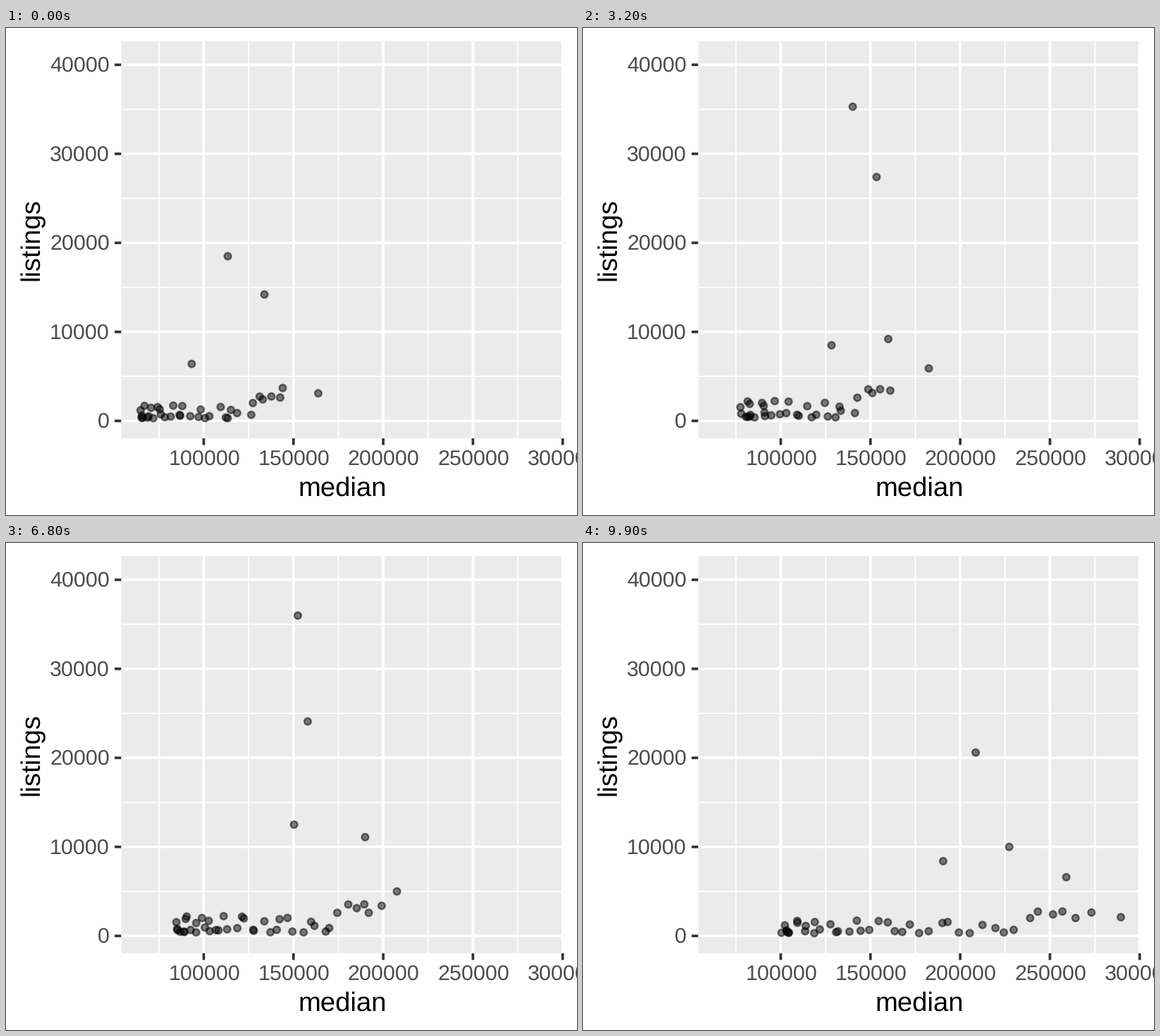
Recreate the animation shown at these times as a matplotlib script. Size 810 by 692 pixels, loop 10000 ms.

```python
import numpy as np
import matplotlib.pyplot as plt
from matplotlib.animation import FuncAnimation
from matplotlib.patches import Rectangle

W, H, DPI = 810, 692, 100
FRAMES, YEARS, SMALL = 100, 15, 41
PT = 72 / DPI                                  # points per pixel
LEFT, RIGHT, TOP, BOTTOM = 163.6, 791.2, 18.6, 583
MAJOR, MINOR, TICK = 3.7, 1.85, 9.5
TEXT, TITLE = 30.5, 38.2
RADIUS, RING = 4.9, 2.4

plt.rcParams.update({"font.family": "Liberation Sans", "path.snap": False,
                     "text.hinting": "none"})

fig = plt.figure(figsize=(W / DPI, H / DPI), dpi=DPI, facecolor="white")
ax = fig.add_axes([0, 0, 1, 1])
ax.set(xlim=(0, W), ylim=(H, 0))
ax.axis("off")


def to_x(thousands):
    return 280.5 + (thousands - 100) * 2.546


def to_y(thousands):
    return 558.3 - thousands * 12.65


def line(x, y, width, color="white", z=1):
    ax.plot(x, y, color=color, lw=width * PT, solid_capstyle="butt", zorder=z)


def label(x, y, s, size, color, ha="center", **kw):
    ax.text(x, y, s, size=size * PT, color=color, ha=ha, va="baseline", **kw)


# Panel, grid lines and axes
ax.add_patch(Rectangle((LEFT, TOP), RIGHT - LEFT, BOTTOM - TOP,
                       fc="#EBEBEB", ec="none", zorder=0))
for v in range(75, 300, 50):
    line([to_x(v)] * 2, [TOP, BOTTOM], MINOR)
for v in range(5, 40, 10):
    line([LEFT, RIGHT], [to_y(v)] * 2, MINOR)
for v in range(100, 301, 50):
    x = to_x(v)
    line([x, x], [TOP, BOTTOM], MAJOR, z=2)
    line([x, x], [BOTTOM, BOTTOM + TICK], MAJOR, "#333333")
    label(x + 0.7, 621.8, str(v * 1000), TEXT, "#4D4D4D", clip_on=True)
for v in range(0, 41, 10):
    y = to_y(v)
    line([LEFT, RIGHT], [y, y], MAJOR, z=2)
    line([LEFT - TICK, LEFT], [y, y], MAJOR, "#333333")
    label(147, y + 10.6, str(v * 1000), TEXT, "#4D4D4D", ha="right")
label(477.3, 665, "median", TITLE, "black")
label(47, 300.7, "listings", TITLE, "black",
      rotation=90, rotation_mode="anchor")

# Key years, with prices and listings in thousands
KEYS = [0, 1.82, 4.85, 7.27, 10.3, 13.18, YEARS]
MARKETS = [
    ([113.4, 127.9, 140.1, 151.1, 152.4, 181.5, 208.6],
     [18.5, 23.7, 35.3, 40.1, 36.0, 20.3, 20.6]),
    ([133.8, 144.2, 153.4, 157.7, 157.9, 191.3, 227.3],
     [14.2, 20.8, 27.4, 30.7, 24.1, 12.4, 10.0]),
    ([93.3, 105.1, 128.3, 147.5, 150.3, 170.1, 190.5],
     [6.4, 7.1, 8.5, 12.4, 12.5, 9.1, 8.4]),
    ([144.0, 153.6, 159.9, 184.8, 189.9, 223.7, 259.1],
     [3.7, 8.6, 9.2, 10.3, 11.1, 6.1, 6.6]),
    ([163.8, 175.6, 182.5, 200.5, 207.6, 243.0, 289.5],
     [3.1, 4.9, 5.9, 7.1, 5.0, 2.4, 2.1]),
]
CHEAPEST = [65.3, 69, 79, 79.5, 85.5, 89, 101]
DEAREST = [144, 151.7, 160.7, 177.8, 197.8, 236.3, 272.4]

# Small towns: rank sets the price, chance the listings; some enter late
rng = np.random.default_rng(4)
rank = np.linspace(0, 1, SMALL)
phase = rng.uniform(0, 2 * np.pi, SMALL)
stock = 0.3 + 1.5 * rng.random(SMALL) ** 2 + 1.7 * (rank > 0.86)
born = np.where(np.arange(SMALL) % 6 == 3, 9, 0)


def small_towns(t):
    low, high = np.interp(t, KEYS, CHEAPEST), np.interp(t, KEYS, DEAREST)
    price = low + (high - low) * rank ** 1.7 + 1.5 * np.sin(t + phase)
    listings = stock * (1 + 0.35 * np.sin(np.pi * t / YEARS))
    here = born <= t
    return price[here], listings[here]


# Two equal colours keep the dots on sub-pixel positions
dots = ax.scatter([], [], s=(2 * RADIUS * PT) ** 2, lw=RING * PT, zorder=3)
dots.set_facecolor([(0, 0, 0, 0.5)] * 2)
dots.set_edgecolor([(0, 0, 0, 0.5)] * 2)


def draw(i):
    t = YEARS * i / (FRAMES - 1)
    big = [(np.interp(t, KEYS, p), np.interp(t, KEYS, n)) for p, n in MARKETS]
    price, listings = np.hstack([small_towns(t), np.transpose(big)])
    dots.set_offsets(np.column_stack([to_x(price), to_y(listings)]))
    return dots,


anim = FuncAnimation(fig, draw, frames=FRAMES, interval=100, repeat=True,
                     repeat_delay=0)
plt.show()
```
